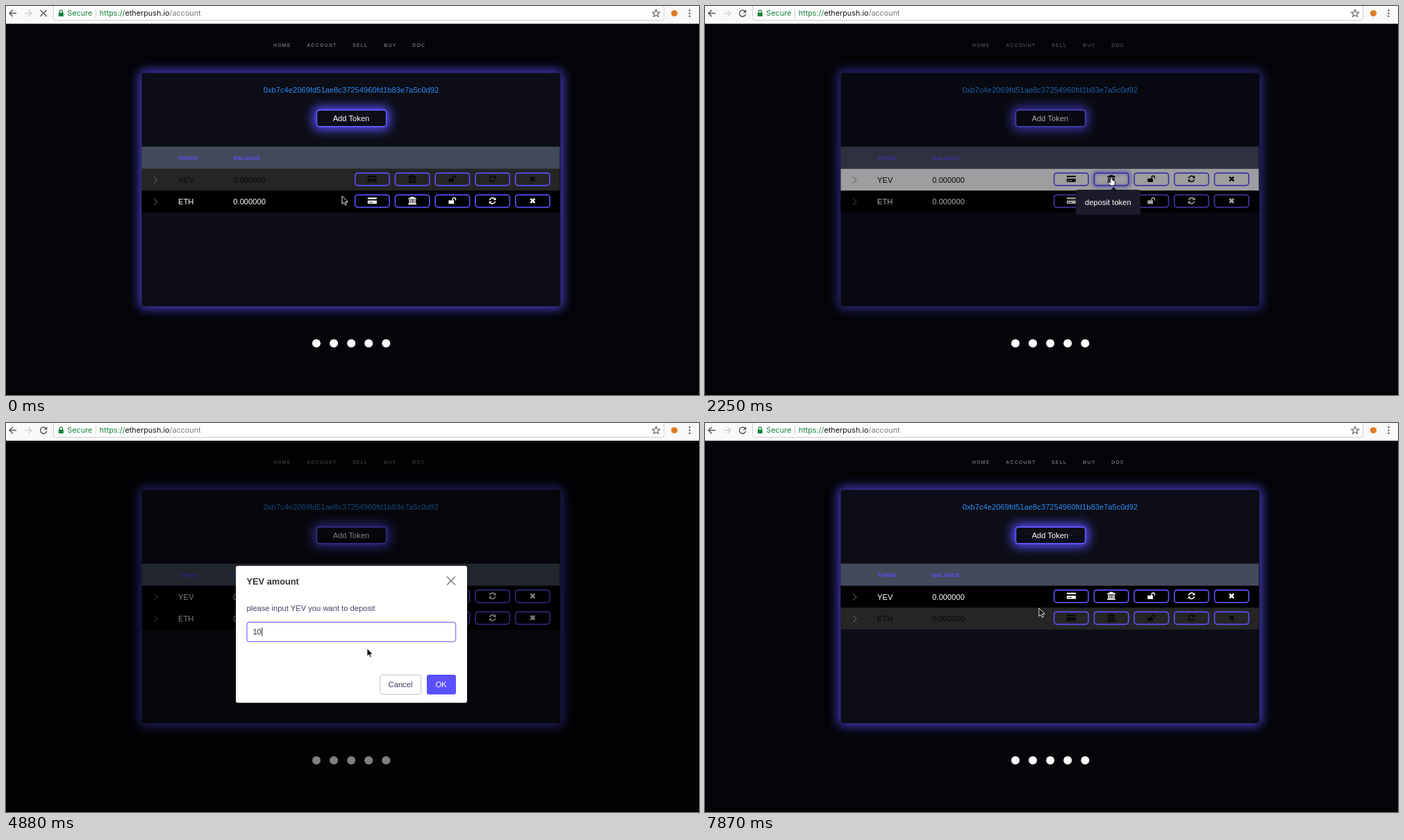
Recreate the animation shown at these times as an HTML page. Size 998x561 px, loop 8 s.

```html
<!DOCTYPE html>
<html lang="en">
<head>
<meta charset="utf-8">
<title>Token account</title>
<style>
  html, body { margin: 0; width: 100%; height: 100%; overflow: hidden; background: #030408; }
  svg { display: block; width: 100vw; height: 100vh; }
  text { font: 11.2px "Liberation Sans", Arial, sans-serif; white-space: pre; }
  .nav { font-size: 7px; font-weight: bold; letter-spacing: 1.15px; fill: #6c6c72; }
  .head { font-size: 8px; font-weight: bold; fill: #5a4ff5; }
  .title { font-size: 12.8px; font-weight: bold; fill: #333; }
  .url { font: 10.8px Inter, sans-serif; }
  .mid { text-anchor: middle; }
</style>
</head>
<body>
<svg viewBox="0 0 998 561" xmlns="http://www.w3.org/2000/svg">
  <defs>
    <filter id="glow" x="-30%" y="-150%" width="160%" height="400%" color-interpolation-filters="sRGB"><feGaussianBlur stdDeviation="7.5"/></filter>
    <filter id="soft" x="-30%" y="-80%" width="160%" height="260%" color-interpolation-filters="sRGB"><feGaussianBlur stdDeviation="2.5"/></filter>
    <path id="card" fill-rule="evenodd" d="M-6.5-4.5H6.5V4.5H-6.5ZM-6.5-2.4V-.3H6.5V-2.4ZM-5 1.9V2.9H-3V1.9ZM-2.2 1.9V2.9H.6V1.9Z"/>
    <path id="bank" d="M0-6 6-3.4V-2.4H-6V-3.4ZM-4.6-1.8h1.7V3h-1.7ZM-2-1.8h1.4V3H-2ZM.6-1.8H2V3H.6ZM2.9-1.8h1.7V3H2.9ZM-5.3 3.2H5.3V4.2H-5.3ZM-6 4.5H6V5.6H-6Z"/>
    <g id="lock"><path d="M-5.5-.5H2.2V4.6H-5.5Z"/><path d="M.4-.3V-2.2a2.1 2.1 0 0 1 4.2 0V-.6" fill="none" stroke="currentColor" stroke-width="1.5"/></g>
    <g id="sync"><path d="M-4-.8A4.1 4.1 0 0 1 3.2-2.6M4 .8A4.1 4.1 0 0 1-3.2 2.6" fill="none" stroke="currentColor" stroke-width="1.6"/><path d="M4.9-4.8V-.9H1ZM-4.9 4.8V.9H-1Z"/></g>
    <path id="cross" d="M-3-3 3 3M3-3-3 3" stroke="currentColor" stroke-width="2.6"/>
  </defs>

  <g id="page">
    <text id="nav" class="nav" x="385" y="58.6"></text>
    <rect x="191.5" y="92.5" width="611" height="344.5" rx="8" fill="#463ec4" filter="url(#glow)"/>
    <rect x="195.5" y="96.5" width="603" height="336.5" rx="4" fill="#0c0d16"/>
    <text class="mid" x="497" y="125.4" fill="#2d8cf0">0xb7c4e2069fd51ae8c37254960fd1b83e7a5c0d92</text>
    <rect x="442.5" y="145.5" width="110" height="33" rx="8" fill="#5a50ff" filter="url(#glow)"/>
    <rect x="447.4" y="150" width="100.4" height="24" rx="4" fill="#0c0d16" stroke="#5f55f5" stroke-width="1.8"/>
    <text class="mid" x="497" y="165.8" fill="#fff">Add Token</text>
    <rect x="195.5" y="202.8" width="602" height="32" fill="#434a5c"/>
    <text class="head" x="248" y="221.8">TOKEN</text>
    <text class="head" x="327.3" y="221.8">BALANCE</text>
    <g id="rows"></g>
    <rect id="halo" x="559.5" y="240" width="52" height="20" rx="5" fill="none" stroke="#5a50ff" stroke-width="2.5" filter="url(#soft)"/>
  </g>
  <g id="tip">
    <path d="M584 265.5 588.5 261 593 265.5Z" fill="#1c1b2b"/>
    <rect x="534" y="265" width="93" height="36" rx="3" fill="#1c1b2b"/>
    <text class="mid" x="580.4" y="287" fill="#fff">deposit token</text>
  </g>
  <g id="footer" fill="#fff"></g>
  <rect id="mask" y="25" width="998" height="536"/>
  <rect id="bar" y="25" width="998" height="2.8" fill="#5a50e0"/>

  <g id="modal">
    <rect x="331" y="206" width="333" height="197.5" rx="3" fill="#fff"/>
    <text class="title" x="346.5" y="233">YEV amount</text>
    <path d="M635 221.5l12 12m0-12-12 12" stroke="#808080" stroke-width="1.6"/>
    <text x="346.5" y="271.3" fill="#46425e">please input YEV you want to deposit</text>
    <rect id="field" x="347" y="287.3" width="300.7" height="28" rx="3" fill="#fff"/>
    <text id="typed" x="355.4" y="305.2" fill="#2f2c45"></text>
    <path id="caret" d="M0 295v12.5" stroke="#222"/>
    <rect x="538.8" y="363.3" width="59" height="28" rx="3" fill="#fff" stroke="#c4c4c8"/>
    <text class="mid" x="568" y="381.3" fill="#3a3654">Cancel</text>
    <rect x="606" y="363" width="42" height="28.5" rx="3" fill="#5a50ff"/>
    <text class="mid" x="626.5" y="381.3" fill="#fff">OK</text>
  </g>

  <g fill="none" stroke="#5a5a5a" stroke-width="1.5">
    <rect width="998" height="25.6" fill="#f9f9f9" stroke="none"/>
    <path d="M68.5-3V17.5q0 3 3 3H944.5q3 0 3-3V-3Z" fill="#fff" stroke="#cfcfcf" stroke-width="1"/>
    <path d="M15 10.5H5.5M9.8 5.8 5 10.5l4.8 4.7"/>
    <path d="M27 10.5H36.5M32.2 5.8 37 10.5l-4.8 4.7" stroke="#d2d2d2"/>
    <path id="stop" d="M49.5 6l9 9m0-9-9 9"/>
    <g id="reload"><path d="M58 8.2A4.6 4.6 0 1 0 58.6 11.6"/><path d="M59.3 5V9.7H54.6Z" fill="#5a5a5a" stroke="none"/></g>
    <path d="M77.2 10V8a2.1 2.1 0 0 1 4.2 0v2" stroke="#16803c" stroke-width="1.3"/>
    <rect x="75.8" y="9.5" width="7" height="5.6" rx=".7" fill="#16803c" stroke="none"/>
    <path d="M129.5 4V17" stroke="#ccc" stroke-width="1"/>
    <path d="M936.2 5.2 937.7 8.8 941.6 9.1 938.6 11.6 939.6 15.4 936.2 13.3 932.8 15.4 933.8 11.6 930.8 9.1 934.7 8.8Z" stroke-width="1.1"/>
    <circle cx="962.5" cy="10.5" r="4.6" fill="#df7c27" stroke="none"/>
    <path d="M984.5 6.2h.01M984.5 10.5h.01M984.5 14.8h.01" stroke-width="2.4" stroke-linecap="round"/>
  </g>
  <text class="url" x="88.3" y="14.4" fill="#16803c">Secure</text>
  <text class="url" x="134.8" y="14.4" fill="#777"><tspan fill="#16803c">https://</tspan><tspan fill="#111">etherpush.io</tspan>/account</text>

  <g id="pointer">
    <path id="arrow" d="M0 0V11.6L2.7 9.1 4.5 13.2 6.5 12.3 4.7 8.4H8.3Z" stroke="#fff" stroke-width=".9"/>
    <path id="hand" d="M-1 0Q.3-1.2 1 .2L1.5 4 3 4.2 5 5Q6 5.6 5.6 7.5L4.6 12H-1.3L-4.4 7.7Q-5 6-3.3 6.2L-1.4 8Z" fill="#fff" stroke="#000" stroke-width=".9"/>
    <path id="beam" d="M-2-6Q0-6 0-5 0-6 2-6M0-5V5M-2 6Q0 6 0 5 0 6 2 6" fill="none" stroke="#222"/>
  </g>
</svg>
<script>
const $ = id => document.getElementById(id);
const LOOP = 8000;
const ICONS = ['card', 'bank', 'lock', 'sync', 'cross'];
const MENU = ['HOME', 'ACCOUNT', 'SELL', 'BUY', 'DOC'];

const ROWS = [
  { name: 'YEV', y: 234.8, hovers: [[-30, 480], [2000, 2710]] },
  { name: 'ETH', y: 266.3, hovers: [[480, 640], [7840, LOOP]] }
];

const HOME = { x: 484, y: 274 };
const MOVES = [
  { from: 150, to: 1130, x: 454, y: 387 },
  { from: 1570, to: 2250, x: 585, y: 247 },
  { from: 3100, to: 3630, x: 562, y: 300 },
  { from: 4410, to: 4880, x: 520, y: 325 },
  { from: 4960, to: 5480, x: 620, y: 374 },
  { from: 7300, to: 7870, x: 481, y: 267 }
];

const within = (t, from, to) => t >= from && t < to;
const ramp = (t, from, to) => Math.min(1, Math.max(0, (t - from) / (to - from)));
const smooth = p => p * p * (3 - 2 * p);
const show = (id, on) => $(id).setAttribute('visibility', on ? 'visible' : 'hidden');
const set = (id, attrs) => Object.entries(attrs).forEach(([k, v]) => $(id).setAttribute(k, v));

function rowMarkup({ name, y }) {
  const buttons = ICONS.map((icon, i) => {
    const x = 527.4 + i * 57.75;
    return `<rect x="${x - 24.7}" y="${y + 6}" width="49.4" height="18" rx="4"
      fill="none" stroke="#5a4ff5" stroke-width="1.7"/>
      <use href="#${icon}" x="${x}" y="${y + 14.5}"/>`;
  }).join('');
  return `<g fill="currentColor"><rect x="195.5" y="${y}" width="602" height="31.6"/>
    <path d="M213 ${y + 11}l5 5-5 5" fill="none" stroke="#777"/>
    <text x="248" y="${y + 19.8}">${name}</text>
    <text x="327.3" y="${y + 19.8}">0.000000</text>${buttons}</g>`;
}

function build() {
  $('nav').innerHTML = MENU.map((label, i) => `<tspan dx="${i ? 22.7 : 0}">${label}</tspan>`).join('');
  $('rows').innerHTML = ROWS.map(rowMarkup).join('');
  $('footer').innerHTML = ICONS.map((_, i) => `<circle cx="${447 + i * 25.1}" cy="486.5" r="6"/>`).join('');
}

// Text flips at once; the background eases in and out.
function drawRow(row, group, t) {
  const levels = row.hovers.map(([on, off]) => ramp(t, on, on + 200) * (1 - ramp(t, off, off + 400)));
  const gray = Math.round(240 * Math.max(...levels));
  group.firstElementChild.setAttribute('fill', `rgb(${gray},${gray},${gray})`);
  group.style.color = row.hovers.some(([on, off]) => within(t, on, off)) ? '#08080a' : '#fff';
}

function pointerAt(t) {
  return MOVES.reduce((pos, move) => {
    const p = smooth(ramp(t, move.from, move.to));
    return { x: pos.x + (move.x - pos.x) * p, y: pos.y + (move.y - pos.y) * p };
  }, HOME);
}

function drawModal(t) {
  const entered = ramp(t, 2600, 3180), left = ramp(t, 5810, 6500);
  const focused = within(t, 3870, 5640);
  const typed = '10'.slice(0, t < 4410 ? 0 : t < 4720 ? 1 : 2);
  set('mask', { opacity: .5 * ramp(t, 2600, 3100) * (1 - ramp(t, 5810, 6340)) });
  set('modal', { opacity: entered * (1 - left), transform: `translate(0 ${-14 * (1 - entered + left)})` });
  set('field', { stroke: focused ? '#5a50ff' : '#b4b4ba' });
  set('caret', { transform: `translate(${356.3 + typed.length * 6.23} 0)` });
  $('typed').textContent = typed;
  show('caret', focused);
}

function drawPointer(t) {
  const { x, y } = pointerAt(t);
  const hand = within(t, 2250, 2600) || within(t, 5480, 6110);
  const beam = within(t, 3630, 4560);
  set('pointer', { transform: `translate(${x} ${y})` });
  show('hand', hand);
  show('beam', beam);
  show('arrow', !hand && !beam);
}

function render(t) {
  set('page', { opacity: t < 1390 ? 1 : .18 + .82 * ramp(t, 1390, 2800) ** 1.1 });
  ROWS.forEach((row, i) => drawRow(row, $('rows').children[i], t));
  drawModal(t);
  drawPointer(t);
  show('tip', within(t, 2250, 2600));
  show('halo', within(t, 2250, 2710));
  show('bar', within(t, 1390, 1800) || within(t, 5640, 6110));
  show('stop', t < 480);
  show('reload', t >= 480);
}

build();
const start = performance.now();
function tick() {
  render((performance.now() - start) % LOOP);
  requestAnimationFrame(tick);
}
tick();
</script>
</body>
</html>
```
